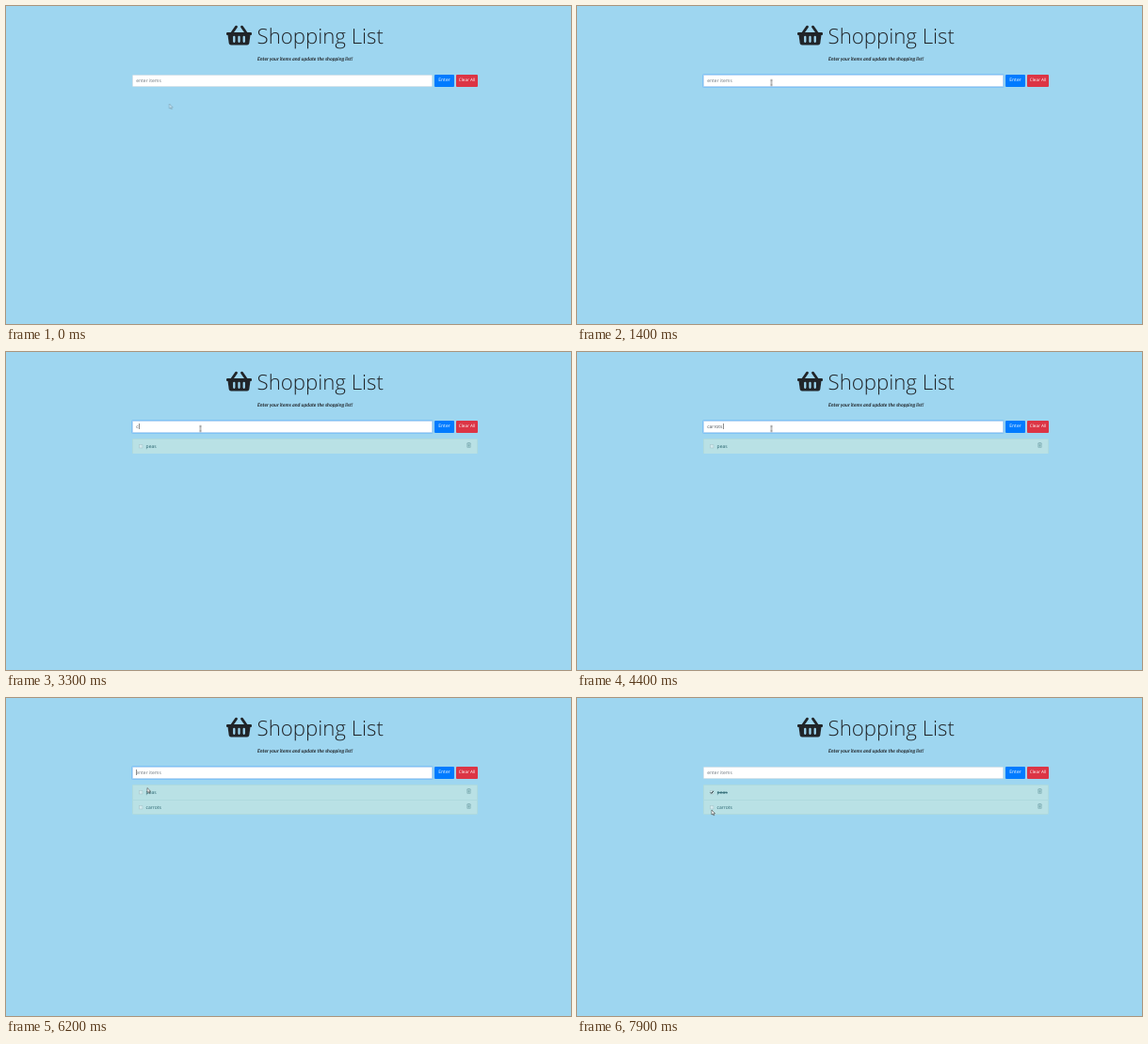
An HTML page for the animation above (8 s loop, 600 by 338 pixels).

```html
<!DOCTYPE html>
<html lang="en">
<head>
<meta charset="utf-8">
<title>Shopping List</title>
<style>
  html, body { margin: 0; width: 100%; height: 100%; overflow: hidden; }
  body {
    position: relative; background: #9ed6f0; color: #212529;
    font: 5px/1 "Open Sans", "Noto Sans", sans-serif;
    text-rendering: geometricPrecision;
  }
  body > *, .row > *, .hint { position: absolute; white-space: pre; box-sizing: border-box; }
  svg { overflow: visible; }

  .basket { left: 234px; top: 18.8px; width: 27px; height: 24px; }
  h1 { left: 266.6px; top: 16px; margin: 0; font-size: 22.2px; font-weight: 300; line-height: 32px; }
  .lead { left: 267px; top: 52.6px; font: italic 700 5.28px/9px Lato, sans-serif; }

  .field, .ring { left: 134px; top: 73px; width: 319px; height: 13px; border-radius: 1.3px; }
  .field {
    padding-left: 3.2px; border: 1px solid #d3e3ec;
    background: #fff; color: #495057; line-height: 13.4px;
  }
  .ring { box-shadow: inset 0 0 0 .5px #a3cffb, 0 0 0 1px rgba(64, 156, 255, .32); }
  .hint { left: 3.2px; top: 0; color: #6c757d; }
  .typed::before { content: ""; }
  .caret {
    display: inline-block; width: 1px; height: 6px; margin-right: -1px;
    vertical-align: -1.3px; background: #8c8c8c;
  }
  .btn {
    top: 73px; height: 13px; border-radius: 1px;
    color: #fff; text-align: center; line-height: 13.8px;
  }
  .enter { left: 455px; width: 21px; background: #007bff; }
  .clear { left: 478px; width: 23px; background: #dc3545; font-size: 4.6px; }

  .row {
    left: 134px; width: 367px; height: 16px; color: #24606b;
    background: #b9e1e5; border: 1px solid #aedade;
  }
  .one { top: 92px; border-bottom: 0; border-radius: 1.3px 1.3px 0 0; }
  .two { top: 108px; border-radius: 0 0 1.3px 1.3px; }
  .row span { left: 13.6px; top: 0; line-height: 16px; }
  .box { left: 5.6px; top: 4.7px; width: 4.4px; height: 4.4px; }
  .bin { left: 354.4px; top: 2.6px; width: 5px; height: 6px; }
  .strike { left: 13.5px; top: 7px; width: 11px; height: 1px; background: rgba(36, 96, 107, .7); }

  .mouse { left: 0; top: 0; width: 6px; height: 8px; }

  /* All timelines share one 8 s clock; the small lead keeps changes clear of tick edges. */
  .ring, .hint, .typed::before, .caret, .row, .done, .mouse, .arrow, .beam {
    animation: 8s -.04s linear infinite;
  }
  .hint, .typed::before, .caret, .row, .done, .arrow, .beam { animation-timing-function: step-end; }
  .ring { animation-name: focus; }
  .hint { animation-name: hint; }
  .typed::before { animation-name: type; }
  .caret { animation-name: blink; }
  .one { animation-name: add-one; }
  .two { animation-name: add-two; }
  .done { animation-name: check; }
  .mouse { animation-name: move; }
  .arrow { animation-name: arrow; }
  .beam { animation-name: beam; }

  @keyframes focus { 0%, 10.6% { opacity: 0 } 12.5%, 91.25% { opacity: 1 } 93.2%, 100% { opacity: 0 } }
  @keyframes hint {
    0%, 37.5%, 61.25%, 100% { opacity: 1 }
    18.75%, 41.25% { opacity: 0 }
  }
  @keyframes type {
    0%, 37.5%, 61.25%, 100% { content: "" }
    18.75% { content: "p" }
    21.25% { content: "pe" }
    23.75% { content: "pea" }
    31.25% { content: "peas" }
    41.25% { content: "c" }
    45% { content: "ca" }
    47.5% { content: "car" }
    48.75% { content: "carr" }
    51.25% { content: "carro" }
    52.5% { content: "carrot" }
    55% { content: "carrots" }
  }
  @keyframes blink {
    0%, 17.5%, 30%, 67.5%, 80%, 91.25%, 100% { opacity: 0 }
    11.25%, 18.75%, 31.25%, 73.75%, 86.25% { opacity: 1 }
  }
  @keyframes add-one { 0% { opacity: 0 } 37.5%, 100% { opacity: 1 } }
  @keyframes add-two { 0% { opacity: 0 } 61.25%, 100% { opacity: 1 } }
  @keyframes check { 0% { opacity: 0 } 92.5%, 100% { opacity: 1 } }
  @keyframes move {
    0%, 1% { transform: translate(173.5px, 104px) }
    5% { transform: translate(187px, 95px); animation-timing-function: ease-out }
    10%, 72.5% { transform: translate(206.5px, 81.5px) }
    75% { transform: translate(182px, 86px) }
    77%, 79% { transform: translate(150px, 95.5px) }
    84%, 92.5% { transform: translate(143px, 100px) }
    94% { transform: translate(143px, 109px) }
    97.5%, 100% { transform: translate(143px, 119px) }
  }
  @keyframes arrow { 0% { opacity: .4 } 3% { opacity: 1 } 7.2% { opacity: 0 } 75%, 100% { opacity: 1 } }
  @keyframes beam { 0%, 75%, 100% { opacity: 0 } 7.2% { opacity: 1 } }
</style>
</head>
<body>
  <svg class="basket" viewBox="0 0 576 512" fill="#212529">
    <path d="M124 208 224 66M452 208 352 66" stroke="#212529" stroke-width="58" stroke-linecap="round"/>
    <rect y="192" width="576" height="64" rx="24"/>
    <path d="M32 250H544L518 439Q512 480 470 480H106Q64 480 58 439Z"/>
    <path d="M176 294V402M288 294V402M400 294V402" stroke="#9ed6f0" stroke-width="48" stroke-linecap="round"/>
  </svg>
  <h1>Shopping List</h1>
  <div class="lead">Enter your items and update the shopping list!</div>

  <div class="field"><span class="hint">enter items</span><span class="typed"></span><i class="caret"></i></div>
  <div class="ring"></div>
  <div class="btn enter">Enter</div>
  <div class="btn clear">Clear All</div>

  <svg width="0" height="0">
    <symbol id="box" viewBox="0 0 4 4">
      <rect x=".2" y=".2" width="3.6" height="3.6" rx=".5" fill="#d3eaee" stroke="#86a5ab" stroke-width=".4"/>
    </symbol>
    <symbol id="bin" viewBox="0 0 5 6">
      <path d="M.3 1.1H4.7M1.7 1V.4H3.3V1M.8 1.2V5.1Q.8 5.6 1.3 5.6H3.7Q4.2 5.6 4.2 5.1V1.2M1.8 2.2V4.6M2.5 2.2V4.6M3.2 2.2V4.6"
        fill="none" stroke="#4a7f88" stroke-width=".36"/>
    </symbol>
  </svg>
  <div class="row one">
    <svg class="box"><use href="#box"/></svg>
    <svg class="box done" viewBox="0 0 4 4"><path d="M.6 2.1 1.6 3.1 3.5.8" fill="none" stroke="#1c2b30" stroke-width=".9"/></svg>
    <span>peas</span><i class="strike done"></i>
    <svg class="bin"><use href="#bin"/></svg>
  </div>
  <div class="row two">
    <svg class="box"><use href="#box"/></svg>
    <span>carrots</span>
    <svg class="bin"><use href="#bin"/></svg>
  </div>

  <svg class="mouse">
    <path class="arrow" d="M0 0V5.1L1.2 4 2 5.9 2.8 5.5 2 3.7H3.6Z" fill="#fff" stroke="#222" stroke-width=".5"/>
    <path class="beam" d="M-1-2.8H1M0-2.8V2.8M-1 2.8H1" fill="none" stroke="#222" stroke-width=".6"/>
  </svg>
</body>
</html>
```
